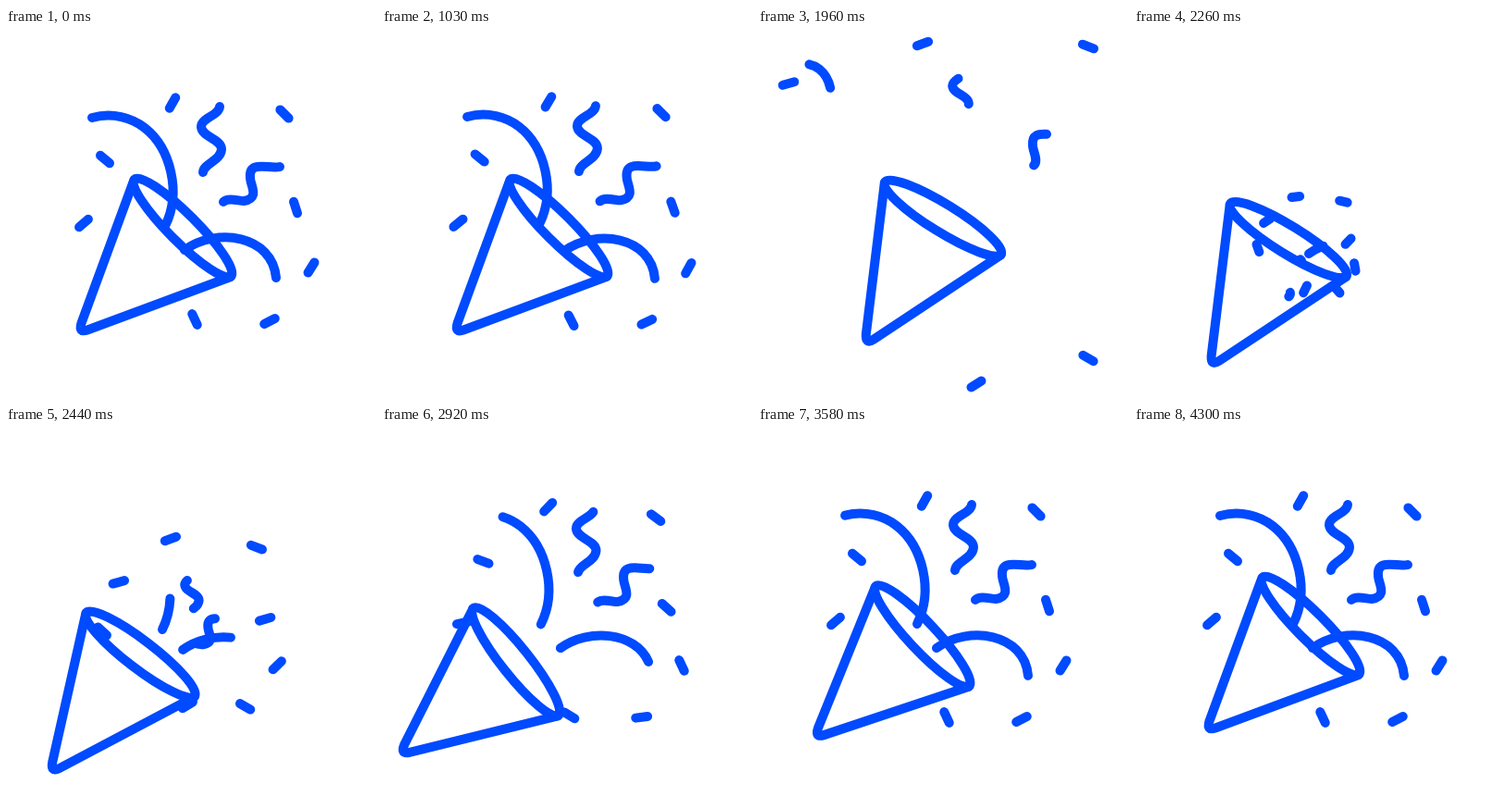
Animation, 400 px wide and 400 px high, one loop 4360 ms. Source, as an HTML page:

```html
<!DOCTYPE html>
<html lang="en">
<head>
<meta charset="utf-8">
<title>Party popper</title>
<style>
  html, body { margin: 0; width: 100%; height: 100%; overflow: hidden; background: #fff; }
  svg { display: block; width: 100vw; height: 100vh; }
  path, ellipse { fill: none; stroke: #004aff; stroke-width: 10; stroke-linecap: round; stroke-linejoin: round; }
</style>
</head>
<body>
<svg id="stage" viewBox="0 0 400 400">
  <g id="cone">
    <ellipse cx="191" cy="216" rx="74" ry="15" transform="rotate(45 191 216)"/>
    <path d="M137 168 L81.5 319 Q78 330 88 326.5 L243 269"/>
  </g>
</svg>
<script>
const LOOP = 4360, START = 1030, END = 4300, STEP = 30;
const LEAVE = 1000, GONE = 2110, BURST = 2200, REST = 3600;
const MOUTH = { x: 171, y: 258 };
const stage = document.getElementById('stage');
const cone = document.getElementById('cone');

const span = (t, a, b) => Math.min(1, Math.max(0, (t - a) / (b - a)));
const smooth = u => u * u * (3 - 2 * u);
const easeOut = (u, n) => 1 - Math.pow(1 - u, n);
const mix = (a, b, u) => a + (b - a) * u;

// Slow start and longer slow end, as cubic-bezier(.28, 0, .4, 1)
function settle(x) {
  let lo = 0, hi = 1;
  for (let i = 0; i < 20; i++) {
    const s = (lo + hi) / 2, r = 1 - s;
    if (3 * r * s * (0.28 * r + 0.4 * s) + s * s * s < x) lo = s; else hi = s;
  }
  return smooth(lo);
}

function addPath(d) {
  const el = document.createElementNS('http://www.w3.org/2000/svg', 'path');
  el.setAttribute('d', d);
  el.setAttribute('pathLength', 100);
  return stage.appendChild(el);
}

const piece = (x, y, angle, dx, dy, spin) =>
  ({ x, y, angle, dx, dy, spin, el: addPath('M-6.5 0H6.5') });

const confetti = [
  piece(180, 81, -60, -2, -64, 40),
  piece(107, 142, 40, -74, -82, -56),
  piece(301, 93, 45, 56, -73, -24),
  piece(313, 194, 72, 82, -15, -89),
  piece(330, 259, -58, 72, 35, -167),
  piece(285, 317, -27, 72, 40, 57),
  piece(204, 315, 65, 32, 70, -97),
  piece(84, 211, -41, -84, -8, 84)
];

const ribbon = (d, shape) => ({ ...shape, el: addPath(d) });

// out: drift while leaving, scaled to outSize; from: offset at the burst, shrunk by small
const ribbons = [
  ribbon('M172 214C190 178 178 130 150 108C136 97 115 91 93 97',
    { x: 140, y: 150, out: [-78, -88], outSize: 0.42, from: [-8, 16], small: 0, unroll: 2340 }),
  ribbon('M193 240C228 215 288 224 292 270',
    { x: 243, y: 245, out: [190, 60], outSize: 0.42, from: [-5, 5], small: 0, unroll: 2190 }),
  ribbon('M213 156C214 146 232 144 233 131C233 120 212 118 211 107C211 97 230 95 231 85',
    { x: 222, y: 120, out: [-3, -47], outSize: 0.8, from: [-56, 162], small: 0.8 }),
  ribbon('M235 188C240 183 252 187 257 187C275 184 264 170 264 162C262 142 285 153 296 150',
    { x: 265, y: 169, out: [33, -35], outSize: 1, from: [-122, 143], small: 0.66 })
];

// Share of the way back to the mouth during the burst
function pull(t) {
  const age = Math.max(0, t - BURST);
  return Math.max(0, Math.exp(-Math.pow(age / 144, 0.7)) - 0.008);
}

function drawCone(t) {
  const lift = smooth(span(t, LEAVE, 1960));
  const kick = easeOut(span(t, 2140, 2790), 3.6);
  const swing = smooth(span(t, 2250, 2790));
  const away = 1 - settle(span(t, 2790, END));
  const x = mix(13.7 * lift, -50, kick) * away;
  const y = mix(-7 * lift, 38, kick) * away;
  const angle = mix(-13.2 * lift, 6.8, swing) * away;
  cone.setAttribute('transform', `translate(${x} ${y}) rotate(${angle} 174 235)`);
}

function drawPiece(c, t, drift) {
  let x, y, turn, size;
  if (t < BURST) {
    // Pieces that reach the side edges go first
    const atEdge = Math.abs(c.x + c.dx - 200) > 180;
    const gone = atEdge ? GONE - 330 : GONE;
    x = c.x + c.dx * drift;
    y = c.y + c.dy * drift;
    turn = drift;
    size = 1 - span(t, gone - 30, gone + 30);
  } else {
    const q = pull(t);
    x = mix(c.x, MOUTH.x, q);
    y = mix(c.y, MOUTH.y, q);
    turn = 1.45 * Math.pow(1 - span(t, BURST, REST), 2);
    size = span(t, BURST, BURST + 90);
  }
  c.el.style.display = size > 0 ? '' : 'none';
  c.el.setAttribute('transform',
    `translate(${x} ${y}) rotate(${c.angle + c.spin * turn})`);
  c.el.setAttribute('d', `M${-6.5 * size} 0H${6.5 * size}`);
}

function drawRibbon(r, t, drift) {
  let start, end, move, amount, size;
  if (t < BURST) {
    const shrink = Math.pow(span(t, LEAVE, GONE), 4.6);
    start = 0.65 * shrink;
    end = 1 - 0.35 * shrink;
    move = r.out;
    amount = drift;
    size = mix(1, r.outSize, Math.min(1, drift));
  } else {
    amount = Math.pow(1 - span(t, BURST, REST), 5.2);
    start = 0.6 * r.small * amount;
    end = r.unroll ? easeOut(span(t, r.unroll, r.unroll + 1600), 3.4) : 1 - pull(t);
    move = r.from;
    size = 1 - r.small * amount;
  }
  const { style } = r.el;
  style.display = end - start > 0.01 ? '' : 'none';
  style.strokeWidth = 10 / size;
  style.strokeDasharray = `${(end - start) * 100} 300`;
  style.strokeDashoffset = -start * 100;
  r.el.setAttribute('transform',
    `translate(${r.x + move[0] * amount} ${r.y + move[1] * amount}) scale(${size}) translate(${-r.x} ${-r.y})`);
}

function draw(now) {
  let t = now % LOOP;
  if (t < START || t >= END) t = 0;
  else t -= (t - START) % STEP;
  // Quick burst outwards, then a slow drift
  const drift = t ? 0.62 * smooth(span(t, LEAVE, 1500)) + 0.38 * (t - LEAVE) / 960 : 0;
  drawCone(t);
  for (const c of confetti) drawPiece(c, t, drift);
  for (const r of ribbons) drawRibbon(r, t, drift);
}

const begin = performance.now();
function tick() {
  draw(performance.now() - begin);
  requestAnimationFrame(tick);
}
tick();
</script>
</body>
</html>
```
